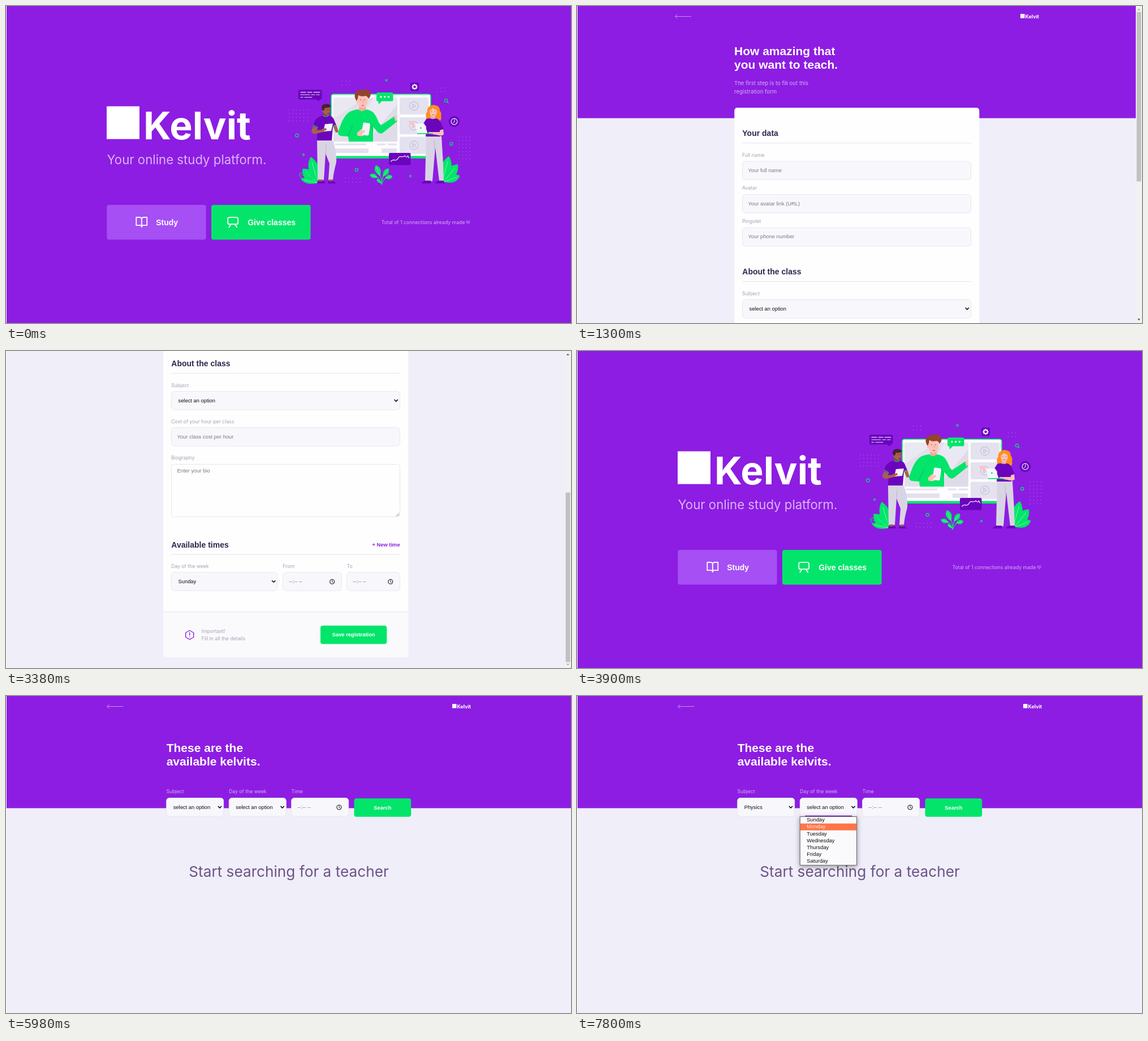
An HTML page that plays this animation: 999x561 px, repeating every 8000 ms.

```html
<!DOCTYPE html>
<html lang="en">
<head>
<meta charset="utf-8">
<title>Study platform</title>
<style>
  html, body { margin: 0; width: 100%; height: 100%; overflow: hidden; background: #fff; }
  svg { display: block; width: 999px; height: 561px; }
  text { font-family: "Liberation Sans", Arial, sans-serif; white-space: pre; }
  .bold { font-weight: 700; }
  .round { font-family: Inter, sans-serif; }
  .mid { text-anchor: middle; }
  .popup { filter: drop-shadow(0 2px 4px #0006); }
</style>
</head>
<body>
<svg id="stage" viewBox="0 0 999 561"></svg>
<script>
const PURPLE = '#8d1de2', DEEP = '#6a05bd', LILAC = '#a54ff5', PALE = '#d5aef6',
      GREEN = '#02e56a', PAGE = '#f0eef8', FIELD = '#f8f8fc', LINE = '#e6e6f0',
      LABEL = '#a79fb5', INK = '#32264d', HINT = '#7b7984', TROUSER = '#d9d4e4',
      SKIN = '#ffc2b4', BROWN = '#a76149', ORANGE = '#ff8f1f';

// Drawing helpers
const text = (x, y, s, size, fill, kind = '') =>
  `<text x="${x}" y="${y}" font-size="${size}" fill="${fill}" class="${kind}">${s}</text>`;
const small = (x, y, s, fill = '#111', kind) => text(x, y, s, 9.35, fill, kind);
const label = (x, y, s, fill = LABEL) => text(x, y, s, 8.7, fill, 'round');
const rect = (x, y, w, h, fill, r = 0, extra = '') =>
  `<rect x="${x}" y="${y}" width="${w}" height="${h}" rx="${r}" fill="${fill}" ${extra}/>`;
const shape = (d, fill) => `<path d="${d}" fill="${fill}"/>`;
const stroke = (d, color, w = 1) =>
  `<path d="${d}" fill="none" stroke="${color}" stroke-width="${w}" stroke-linecap="round" stroke-linejoin="round"/>`;
const disc = (x, y, r, fill) => `<circle cx="${x}" cy="${y}" r="${r}" fill="${fill}"/>`;
const ring = (x, y, r, color, w = 1) =>
  `<circle cx="${x}" cy="${y}" r="${r}" fill="none" stroke="${color}" stroke-width="${w}"/>`;
const oval = (x, y, rx, ry, fill) => `<ellipse cx="${x}" cy="${y}" rx="${rx}" ry="${ry}" fill="${fill}"/>`;
const move = (x, y, body, scale = 1) => `<g transform="translate(${x} ${y}) scale(${scale})">${body}</g>`;

// Interface parts
const brand = (x, y, scale) =>
  move(x, y, rect(0, 0, 58, 58, '#fff') + text(65, 58.5, 'Kelvit', 68, '#fff', 'round bold'), scale);
const backArrow = x => stroke(`M${x + 28} 18.5H${x}m3.5-3.5l-3.5 3.5 3.5 3.5`, '#cd9df5', .9);
const field = (x, y, w, h = 32.5, fill = FIELD) => rect(x, y, w, h, fill, 5, `stroke="${LINE}"`);
const chevron = (x, y) => stroke(`M${x - 2.7} ${y - 1.3}l2.7 2.7 2.7-2.7`, '#111', 1.5);
const select = (x, y, w, s) =>
  field(x, y, w) + small(x + 12, y + 19, s) + chevron(x + w - 6.7, y + 16.2);
const input = (x, y, w, s) => field(x, y, w) + small(x + 10, y + 19, s, HINT);
const time = (x, y, w) => field(x, y, w) + small(x + 10.5, y + 19, '--:-- --', '#6c6680') +
  ring(x + w - 16.7, y + 16.5, 4, '#111', 1.1) +
  stroke(`M${x + w - 16.7} ${y + 14}v2.7l1.8 1`, '#111', .9);
const heading = (y, s) => text(292.3, y, s, 14, INK, 'bold') + rect(292, y + 12, 405, 1, LINE);
const button = (x, y, w, s) => rect(x, y, w, 32.5, GREEN, 4) +
  small(x + w / 2, y + 19.3, s, '#fff', 'bold mid');

function popup(x, items, active) {
  const row = 12.13, top = 213.5;
  return rect(x + 9, 211.6, 83, 1.6, PURPLE) +
    `<g class="popup">${rect(x, top, 100.3, items.length * row + 1, '#fafafc', 0, 'stroke="#666"')}</g>` +
    items.map((s, i) => (i === active ? rect(x + .5, top + i * row, 99.3, row, '#ff7549') : '') +
      small(x + 12, 222.3 + i * row, s, i === active ? '#ffe9e2' : '#111')).join('');
}

// Illustration parts
function dots(x, y, cols, rows, gap = 6.5) {
  let out = '';
  for (let i = 0; i < cols * rows; i++)
    out += disc(x + i % cols * gap, y + Math.floor(i / cols) * gap, .8, '#ab5cf3');
  return out;
}
const leaf = (x, y, len, width, angle, fill = GREEN) =>
  `<g transform="translate(${x} ${y}) rotate(${angle})">` +
  `<path d="M0 0Q${-width} ${-len * .6} 0 ${-len}Q${width} ${-len * .6} 0 0" fill="${fill}" stroke="${GREEN}"/>` +
  stroke(`M0 0V${-len * .8}`, fill === 'none' ? GREEN : '#9df7c3', .7) + '</g>';
const videoCard = y => rect(696, y, 51, 30, '#e5e2ef', 3) +
  ring(721.3, y + 15, 7.7, '#c8bedd', 1.2) + stroke(`M719 ${y + 11.5}v7l5.5-3.5z`, '#c8bedd', 1.2);

const decor = () =>
  dots(500.5, 184, 6, 4) + dots(594.5, 133, 3, 2) + dots(762.5, 145, 3, 2) +
  dots(801, 231.5, 4, 7) + dots(600, 305, 5, 2) +
  ring(514.5, 229, 2.8, GREEN, 1.2) + ring(619.8, 290, 2.6, GREEN, 1.2) + ring(787.3, 244, 2.6, GREEN, 1.2) +
  ring(778, 167.3, 2.7, GREEN, 1.2) + stroke('M780 169.5l2 2', GREEN, 1.3) +
  stroke('M670.8 129.8l3.4 3.4m0-3.4l-3.4 3.4M713.4 299.4l3.2 3.2m0-3.2l-3.2 3.2M526 260.5v5m-2.5-2.5h5', GREEN, 1.2) +
  rect(517, 148, 41.5, 17.5, DEEP, 3) + shape('M548 165h7l-2 4z', DEEP) +
  stroke('M521 152.7h9m3 0h8m3 0h11M521 157h16m3 0h6m3 0h5M521 161.5h4m3 0h13', '#eadcf8', 1.2) +
  rect(715, 135.5, 15, 15, DEEP, 3) + ring(722.5, 143, 3.3, '#fff', 2) +
  stroke('M722.5 138.3v1m0 7.4v1M717.8 143h1m7.4 0h1M719.2 139.7l.7.7m5.2 5.2l.7.7m0-6.6l-.7.7m-5.2 5.2l-.7.7', '#fff', 1.5) +
  disc(792.5, 204.5, 9.7, DEEP) + ring(792.5, 204.5, 5.4, '#fff', 1.1) + stroke('M793 201v4l-2.4 1.6', '#fff');

const plants = () =>
  leaf(551, 313, 47, 17, -15) + leaf(550, 313, 35, 17, -46) +
  leaf(542, 306, 25, 13, -70, 'none') + leaf(549, 313, 28, 9, -76) +
  leaf(772, 311, 46, 17, 14) + leaf(774, 311, 39, 17, 39) + leaf(776, 311, 28, 12, 68) +
  stroke('M664 316q0-15-5-22M664 316q-3-13-12-15M664 316q0-14 8-20M664 316q4-11 11-13', GREEN, 1.2) +
  leaf(661, 300, 19, 9, -21) + leaf(656, 303, 13, 7, -70) + leaf(667, 301, 16, 8, 36) +
  leaf(671, 304, 12, 7, 78) + leaf(662, 313, 9, 4, -42);

const screen = () =>
  rect(575, 156, 176, 113, '#fdfcff', 4, `stroke="${GREEN}" stroke-width="1.6"`) +
  rect(575, 265.5, 176, 4.5, GREEN, 2) +
  rect(579, 162, 113, 78, '#eae8f2', 3) + shape('M692 174v66h-54z', '#dfdce9') +
  shape('M579 200v40h24l47-78h-14z', '#e2dfeb') +
  [162, 197, 231.5].map(videoCard).join('') +
  rect(582, 243.5, 55, 3, '#e4e1ee', 1) + rect(656, 243.5, 15, 3, '#e4e1ee', 1) + rect(675, 243.5, 16, 3, '#e4e1ee', 1) +
  rect(578, 252, 63, 8, '#e4e1ee') + rect(664, 252, 27, 8, '#e4e1ee');

const teacher = () =>
  shape('M608 187q9-4 15-4 6 3 13 0 9 1 14 6 5 6 9 17l4 5 24-16 5 9-25 20q-5 4-10-1l-8-9v26h-43l-1-9-13-1q-7-2-4-9 8-27 20-34z', GREEN) +
  stroke('M605 229l8-18m36 10l-5-14', '#02bd55') +
  shape('M625 174h11v9q-6 6-12 1z', '#f6a99d') + oval(630.5, 168, 9, 12.5, SKIN) +
  oval(621, 169, 2, 3, SKIN) +
  shape('M620 168q-6-9-2-15 4-5 9-4 8-3 14 0 5 4 3 11l-3 4q-2-4-5-5-8 2-13-1 0 5-3 10z', '#94432c') +
  stroke('M626.5 166h1m6 0h1M629.5 176h3', '#59342e', .9) + stroke('M631.5 167v4', '#e99385', .8) +
  shape('M621 224l7-6 8-1 2 8-7 5q-6 1-10-1z', SKIN) +
  rect(0, 0, 13, 22, '#f4f2fa', 2, 'transform="translate(631.5 206) rotate(8)"') +
  shape('M625 222l9-3 1 4-8 5z', SKIN) + shape('M686 196l4-3 2 7-3 5z', SKIN) +
  rect(655, 153, 29.5, 15.5, GREEN, 2.5) + shape('M658 168h7l-6 6z', GREEN) +
  [663, 669.7, 676.4].map(x => disc(x, 160.8, 1.7, '#fff')).join('');

const student = () =>
  shape('M550 238h28q7 19 6 39-5 18-6 31h-8l2-29-7-18-3 47h-11z', TROUSER) + stroke('M565 261l1-16', '#bdb4cd') +
  shape('M552 307h8v4h-8zm19 0h7v4h-7z', BROWN) +
  shape('M551 309q5 3 10 0l4 5h-15zm19 0q5 3 8 0l6 5h-15z', DEEP) +
  shape('M561 188h9v7q-5 4-10 0z', '#80452f') +
  shape('M551 198q5-4 10-4 4 2 8 0 7 0 10 5l5 12-6 3-2 24h-26l1-22-8-3q1-10 8-15z', DEEP) +
  shape('M543 213l8 3-2 4 16-2v4l-17 4q-8 1-8-5zM578 212l6-2 4 13-5 1z', BROWN) +
  stroke('M543 211l8 4m27-1l6-3M561 194q5 3 9 0', GREEN, 1.2) +
  oval(567, 184.5, 6.5, 8.5, BROWN) + oval(560.5, 186, 1.5, 2, BROWN) +
  shape('M560 185q-4-6 0-10 5-3 10-1 4 0 4 4-4 3-10 2l-2 5z', '#40242f') +
  stroke('M567 183.5h1m3 0h1m-3 6h2', '#3e2022', .8) +
  shape('M564 209l14-1-3 13-14 1z', '#f6f4fb') + shape('M558 218l8-2 1 3-6 3z', BROWN);

const colleague = () =>
  shape('M743 230h27l3 50 1 30h-8l-7-60-5 60h-13z', TROUSER) + stroke('M758 255l-1-17', '#bdb4cd') +
  shape('M741 309h10v5h-17q2-3 7-5zm25 0h8l1 5h-17q3-4 8-5z', DEEP) +
  shape('M747 179q7-6 13-3 7 1 7 9 4 5 2 10 2 5-2 9-8-2-16-2-9 2-8-5-2-6 2-10-1-4 2-8z', ORANGE) +
  shape('M751 192h8v10h-9z', '#f6a99d') + oval(755.5, 187.5, 6.3, 8.3, SKIN) +
  shape('M762 184q-5-1-7-4-3 5-8 5-1-7 7-9 8 0 8 8z', ORANGE) +
  stroke('M752 187h1m5 0h1M754 192.5h3', '#6f3b34', .7) +
  shape('M743 200q5-2 8-1 4 2 8 0 6 0 9 6l6 13-7 4 1 9h-26l1-18-5-5z', DEEP) +
  shape('M767 220l6-2 1 9q-3 4-13 1l-14-2v-3l20 0zM725 209l-11-6-4 1 4 3 9 7z', SKIN) +
  shape('M722.5 208h17l6 17h-18z', '#f6f4fb') + shape('M727 225h28v1.6h-28z', GREEN) +
  disc(733.5, 216, 1.4, GREEN) +
  rect(677, 260, 38.5, 21.5, DEEP, 2) +
  stroke('M680.5 275q4-4 7-2 4 0 6-4 2-4 6-2 4 0 6-2 3 5 5 0l2 4', '#fff', 1.1);

// Pages
const bookIcon = stroke('M0-4.7Q0-8.5-3.8-8.5H-9.5V5.7H-2.8Q0 5.7 0 8.6zQ0-8.5 3.8-8.5H9.5V5.7H2.8Q0 5.7 0 8.6', '#fff', 1.8);
const easelIcon = rect(-9, -8.3, 18, 12, 'none', 3, 'stroke="#fff" stroke-width="1.8"') +
  stroke('M-3.5 4l-3.5 5M3.5 4l3.5 5', '#fff', 1.8);

const home = rect(1, 0, 998, 561, PURPLE) + brand(178, 177.5, 1) +
  text(178.5, 279.5, 'Your online study platform.', 22.2, '#d9b5f8', 'round') +
  decor() + plants() + screen() + teacher() + student() + colleague() +
  rect(178.3, 352, 175.3, 61.5, LILAC, 4) + rect(363, 352, 175.6, 61.5, GREEN, 4) +
  move(239.8, 382.5, bookIcon) + move(401.2, 382.5, easelIcon) +
  text(265.2, 388, 'Study', 14, '#fff', 'bold') + text(427.2, 388, 'Give classes', 14, '#fff', 'bold') +
  label(663.7, 386, 'Total of 1 connections already made', PALE) +
  shape('M817 387l-3.6-3.8q-1-2.6 1-3.6 1.6-.5 2.6 1 1-1.5 2.6-1 2 1 1 3.6z', LILAC);

const form = rect(1, 0, 987, 1010, PAGE) + rect(1, 0, 987, 198.5, PURPLE) +
  backArrow(173.5) + brand(784, 14, .13) +
  text(278, 86.8, 'How amazing that', 21, '#fff', 'bold') + text(278, 111, 'you want to teach.', 21, '#fff', 'bold') +
  text(278, 140.3, 'The first step is to fill out this', 9.6, PALE, 'round') +
  text(278, 155, 'registration form', 9.6, PALE, 'round') +
  rect(278.3, 180, 433, 810, '#fefefe', 5) +
  heading(230, 'Your data') +
  label(292, 266.7, 'Full name') + input(292.5, 275, 404, 'Your full name') +
  label(292, 325.2, 'Avatar') + input(292.5, 333.7, 404, 'Your avatar link (URL)') +
  label(292, 383.7, 'Pingolet') + input(292.5, 392.4, 404, 'Your phone number') +
  heading(475, 'About the class') +
  label(292, 511.5, 'Subject') + select(292.5, 519.5, 404, 'select an option') +
  label(292, 575.5, 'Cost of your hour per class') + input(292.5, 583.5, 404, 'Your class cost per hour') +
  label(292, 639.7, 'Biography') + field(292.5, 648.5, 404, 93, '#fefefe') + small(302.5, 663.3, 'Enter your bio', HINT) +
  stroke('M690 740l5-5m-2 5l2-2', '#777', .8) +
  heading(795.5, 'Available times') + small(647.5, 793.7, '+ New time', PURPLE, 'bold') +
  label(292, 832, 'Day of the week') + select(292.5, 839.7, 187.5, 'Sunday') +
  label(489.5, 832, 'From') + time(489.7, 839.7, 103.7) +
  label(602.5, 832, 'To') + time(602.7, 839.7, 93.8) +
  rect(278.3, 909, 433, 81, '#fafafc', 5) + rect(278.3, 909, 433, 1, LINE) +
  stroke('M324.7 942.5l7 4v8l-7 4-7-4v-8zm0 4v4.5m0 3v.1', PURPLE, 1.4) +
  label(345.8, 946.5, 'Important!') + label(345.8, 960.3, 'Fill in all the details') +
  button(556, 934, 117.3, 'Save registration');

const scrollbar = (y, up, down) => rect(988, 0, 11, 561, '#f1f1f1') + rect(989.5, y, 8, 300, '#c1c1c1') +
  shape('M991 7.5h5l-2.5-3z', up) + shape('M991 553.5h5l-2.5 3z', down);

const search = rect(1, 0, 998, 561, PAGE) + rect(1, 0, 998, 198.5, PURPLE) +
  backArrow(178.8) + brand(789, 14, .13) +
  text(283.7, 98.6, 'These are the', 21, '#fff', 'bold') + text(283.7, 122.8, 'available kelvits.', 21, '#fff', 'bold') +
  label(283.5, 171.8, 'Subject', PALE) + label(394, 171.8, 'Day of the week', PALE) + label(504.5, 171.8, 'Time', PALE) +
  select(394.3, 180.5, 101, 'select an option') + time(504.7, 180.5, 101) +
  button(615.5, 181.2, 100.7, 'Search') +
  text(500, 320, 'Start searching for a teacher', 26.2, '#6a5388', 'round mid');

const subjects = ['Arts', 'Biology', 'Sciences', 'Physical education', 'Physics',
  'Geography', 'History', 'Mathematics', 'Portuguese', 'Chemistry'];
const days = ['Sunday', 'Monday', 'Tuesday', 'Wednesday', 'Thursday', 'Friday', 'Saturday'];
const subjectField = s => select(283.7, 180.5, 101, s);

// Each layer lists the steps in which it is visible
const layers = [
  [[0, 3], home],
  [[1], form + scrollbar(10.5, '#a3a3a3', '#505050')],
  [[2], move(0, -448, form) + scrollbar(250.5, '#505050', '#a3a3a3')],
  [[4, 5, 6], search],
  [[4, 5], subjectField('select an option')],
  [[5], popup(284, subjects, 4)],
  [[6], subjectField('Physics') + popup(394.3, days, 1)]
];

const stage = document.getElementById('stage');
stage.innerHTML = layers.map(([, body]) => `<g>${body}</g>`).join('');
const groups = [...stage.children];

const LOOP = 8000, STEP = 1300;
function render() {
  const step = Math.floor(performance.now() % LOOP / STEP);
  layers.forEach(([steps], i) => { groups[i].style.display = steps.includes(step) ? '' : 'none'; });
  requestAnimationFrame(render);
}
render();
</script>
</body>
</html>
```
